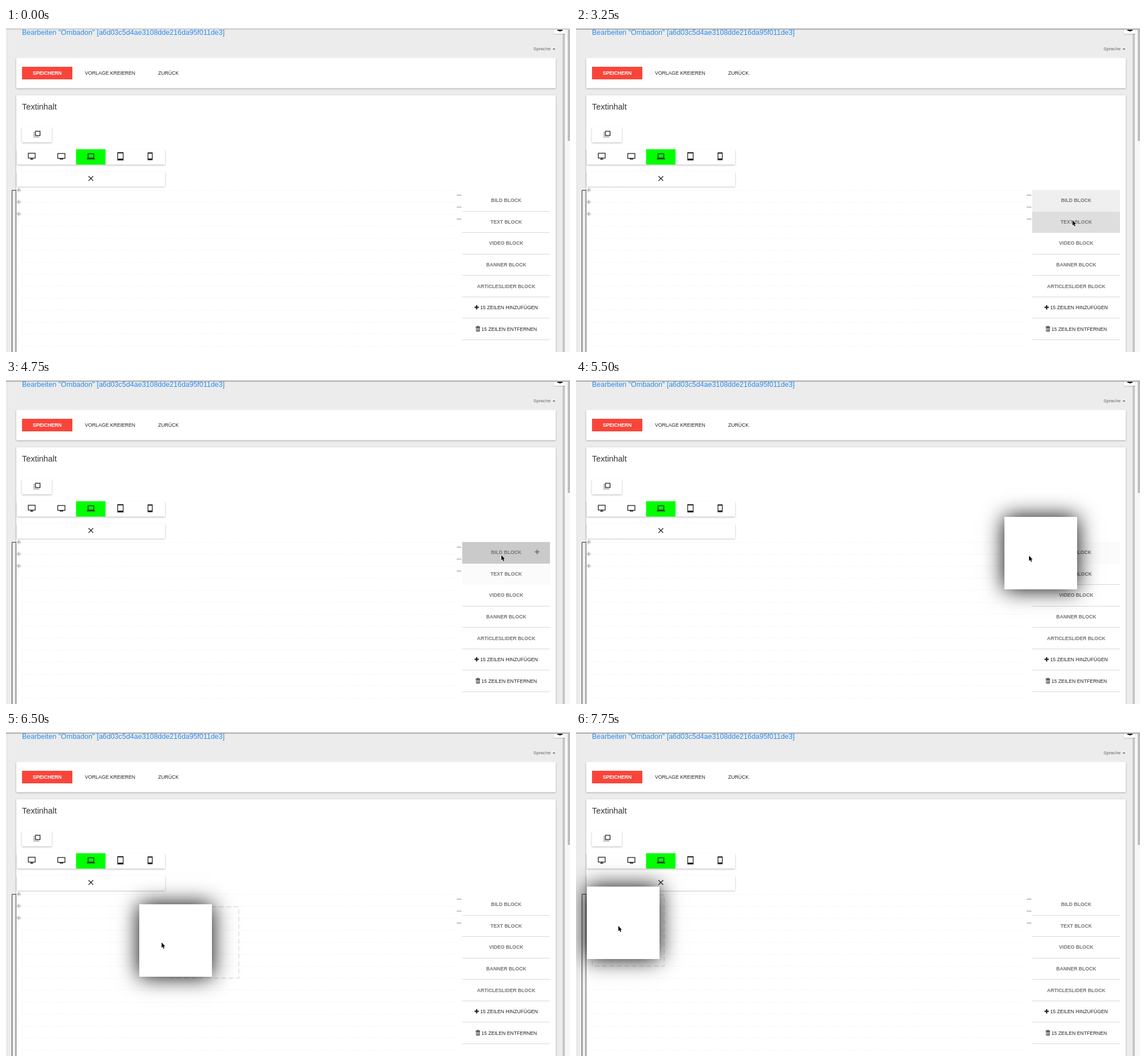
An HTML page with a canvas for the animation above (8 s loop, 986 by 568 pixels).

```html
<!DOCTYPE html>
<html lang="de">
<head>
<meta charset="utf-8">
<title>Block-Editor</title>
<style>
html, body { margin: 0; width: 100%; height: 100%; overflow: hidden; background: #ececec; }
canvas { display: block; }
</style>
</head>
<body>
<canvas id="stage" width="986" height="568"></canvas>
<script>
const W = 986, H = 568, LOOP = 8000, STEP = 250;
const ctx = document.getElementById('stage').getContext('2d');
const FONT = '"Liberation Sans", Arial, sans-serif';
const MENU = ['BILD BLOCK', 'TEXT BLOCK', 'VIDEO BLOCK', 'BANNER BLOCK', 'ARTICLESLIDER BLOCK'];
const ROW_TOP = 284, ROW_H = 37.55;

// time, x, y
const POINTER = [
  [750, 791, 26], [1500, 839, 204], [1750, 839, 204], [3000, 867, 300], [3250, 868, 337],
  [3500, 868, 348], [3750, 868, 366], [4000, 868, 372], [4250, 868, 342], [4500, 867, 314],
  [4750, 866, 307], [5000, 866, 307], [5250, 850, 308], [5500, 792, 308], [5750, 606, 343],
  [6000, 399, 381], [6750, 209, 363], [7000, 173, 359], [7750, 74, 340]
];
const CARD = [
  [5250, 807, 240], [5500, 749, 240], [5750, 556, 276], [6000, 356, 313],
  [6750, 171, 297], [7000, 136, 293], [7750, 19, 271]
];

function along(keys, t) {
  if (t < keys[0][0]) return null;
  const i = keys.findIndex(k => k[0] > t);
  if (i < 0) return keys[keys.length - 1].slice(1);
  const [t0, x0, y0] = keys[i - 1], [t1, x1, y1] = keys[i];
  const p = (t - t0) / (t1 - t0);
  return [Math.round(x0 + (x1 - x0) * p), Math.round(y0 + (y1 - y0) * p)];
}

function rect(x, y, w, h, color) {
  ctx.fillStyle = color;
  ctx.fillRect(x, y, w, h);
}

function line(points, color, width = 1) {
  ctx.strokeStyle = color;
  ctx.lineWidth = width;
  ctx.beginPath();
  points.forEach(([x, y], i) => i ? ctx.lineTo(x, y) : ctx.moveTo(x, y));
  ctx.stroke();
}

function box(x, y, w, h, width = 1.3, color = '#222') {
  ctx.strokeStyle = color;
  ctx.lineWidth = width;
  ctx.strokeRect(x, y, w, h);
}

function text(str, x, y, size, color, bold = false, align = 'left') {
  ctx.font = `${bold ? 'bold ' : ''}${size}px ${FONT}`;
  ctx.fillStyle = color;
  ctx.textAlign = align;
  ctx.fillText(str, x, y);
}

function panel(x, y, w, h, blur = 3, shade = 0.3, dy = 1) {
  ctx.save();
  ctx.shadowColor = `rgba(0,0,0,${shade})`;
  ctx.shadowBlur = blur;
  ctx.shadowOffsetY = dy;
  rect(x, y, w, h, '#fff');
  ctx.restore();
}

function plus(x, y, r, color, width = 2) {
  line([[x - r, y], [x + r, y]], color, width);
  line([[x, y - r], [x, y + r]], color, width);
}

function drawFrame(t) {
  rect(0, 0, W, H, '#ececec');
  rect(0, 0, 1, H, '#f8f8f8');
  rect(1, 0, 1, H, '#e0e0e0');
  rect(973, 0, 4, H, '#c6c6c6');
  rect(977, 0, 9, H, '#f7f7f7');
  rect(982, 0, 4, 198, '#bebebe');
  panel(958, 0, 20, 10, 2, 0.2);
  rect(964, 3, 9, 2, '#222');
  rect(967, 4, 3, 2, '#222');
  rect(0, 0, W, 2, '#e6e6e6');
  rect(0, 1.5, W, 1.5, t < 2000 ? '#cacaca' : '#a2a2a2');
  text('Bearbeiten "Ombadon" [a6d03c5d4ae3108dde216da95f011de3]', 28, 11.5, 12.46, '#2a8af0');
  text('Sprache', 922, 39, 8.1, '#666');
  ctx.beginPath();
  ctx.moveTo(955.5, 36); ctx.lineTo(960.5, 36); ctx.lineTo(958, 38.5);
  ctx.fill();
}

function drawToolbar() {
  panel(18, 52.5, 943, 53);
  rect(28, 68, 88, 22, '#f94539');
  text('SPEICHERN', 72, 82, 8.7, '#fff', true, 'center');
  text('VORLAGE KREIEREN', 138, 82, 8.62, '#222');
  text('ZURÜCK', 266, 82, 8.62, '#222');
}

function drawDevices() {
  panel(19, 212.5, 259, 27);
  rect(122.5, 212.5, 51.5, 27, '#0f0');
  // desktop monitor
  box(39, 219.5, 12, 8.5);
  rect(44, 228, 2, 2, '#222');
  rect(42, 229.5, 6, 1.2, '#222');
  // television
  box(90.5, 220, 12.5, 8.5);
  rect(94, 229, 6, 1.5, '#222');
  // laptop
  box(143.5, 220.5, 10, 7.5);
  rect(141.5, 228.5, 14, 1.7, '#222');
  // tablet
  box(195.3, 218.5, 9.5, 13);
  rect(195, 217.8, 10, 2, '#222');
  rect(195, 229, 10, 2.5, '#222');
  // phone
  box(248.2, 219, 7.5, 12);
  rect(248, 218.3, 8, 2, '#222');
  rect(248, 228.7, 8, 2.5, '#222');
}

function drawEditor() {
  panel(18, 118, 943, 470);
  text('Textinhalt', 28, 143, 14.4, '#333');

  panel(28, 173.5, 52, 27);
  box(51.5, 181, 8, 7.5);
  for (let i = 0; i < 4; i++) {
    rect(48.5, 182.5 + i * 2.6, 1.3, 1.3, '#222');
    if (i) rect(48.5 + i * 2.6, 190.3, 1.3, 1.3, '#222');
  }
  drawDevices();
  panel(19, 251.5, 259, 26.5);
  line([[144.2, 259.7], [152.4, 267.9]], '#222', 1.3);
  line([[152.4, 259.7], [144.2, 267.9]], '#222', 1.3);

  line([[18, 284.5], [10.5, 284.5], [10.5, H]], '#333');
  line([[17.5, 284], [17.5, H]], '#555');
  ctx.setLineDash([2, 2]);
  for (let y = 284.5; y < H; y += 21) line([[28, y], [786, y]], '#f3f3f3');
  ctx.setLineDash([]);
  for (let i = 0; i < 3; i++) {
    plus(22.3, 284 + i * 21, 3.7, '#bdbdbd');
    rect(788, 292 + i * 21, 8, 2, '#c2c2c2');
  }
}

function hoverRow(n) {
  const pos = along(POINTER, n * STEP);
  if (!pos || pos[0] < 797 || pos[1] < ROW_TOP || along(CARD, n * STEP)) return -1;
  return Math.floor((pos[1] - ROW_TOP) / ROW_H);
}

// Darkens over two steps, then fades over two steps.
function hoverShade(row, n) {
  if (hoverRow(n) === row) return hoverRow(n - 1) === row ? '#cacaca' : '#dedede';
  if (hoverRow(n - 1) === row) return '#efefef';
  return hoverRow(n - 2) === row ? '#fbfbfb' : null;
}

function drawMenu(n) {
  for (let i = 0; i < 7; i++) {
    const top = ROW_TOP + i * ROW_H, mid = top + 18.3;
    const shade = hoverShade(i, n);
    rect(797.5, Math.round(top + ROW_H) - 1, 153.5, 1, '#d9d9d9');
    if (shade) rect(797.5, Math.round(top), 153.5, Math.round(top + ROW_H) - Math.round(top), shade);
    if (i < MENU.length) text(MENU[i], 874.5, mid + 3, 8.62, '#757575', true, 'center');
    if (shade === '#cacaca') plus(928.5, mid - 1, 4, '#757575');
  }
  text('15 ZEILEN HINZUFÜGEN', 829, 493.2, 8.6, '#222');
  plus(822.8, 489.6, 3.8, '#222', 2.2);
  text('15 ZEILEN ENTFERNEN', 831.3, 530.8, 8.6, '#222');
  box(822.3, 525, 5.5, 6.5, 1, '#333');
  rect(821, 523.5, 8, 1.2, '#333');
  rect(823.5, 522.4, 3, 1.2, '#333');
  rect(824, 525, 0.8, 6, '#333');
  rect(825.6, 525, 0.8, 6, '#333');
}

function drawCard(x, y) {
  const col = Math.round((x - 28) / 126.5), row = Math.ceil((y - 285) / 21);
  if (col < 6) {
    ctx.setLineDash([8, 5]);
    box(28.5 + col * 126.5, 285.5 + Math.max(0, row) * 21, 125.5, 125, 1.3, '#dcdcdc');
    ctx.setLineDash([]);
  }
  panel(x, y, 127, 127, 36, 1, 0);
}

function drawPointer(x, y) {
  ctx.save();
  ctx.translate(x, y);
  ctx.beginPath();
  [[0, 0], [0, 9], [2, 7.2], [3.5, 10.8], [5, 10.1], [3.6, 6.7], [6.2, 6.5]]
    .forEach(p => ctx.lineTo(...p));
  ctx.closePath();
  ctx.strokeStyle = '#fff';
  ctx.lineWidth = 1.2;
  ctx.stroke();
  ctx.fillStyle = '#000';
  ctx.fill();
  ctx.restore();
}

function draw(t) {
  drawFrame(t);
  drawToolbar();
  drawEditor();
  drawMenu(t / STEP);
  const card = along(CARD, t), pointer = along(POINTER, t);
  if (card) drawCard(...card);
  if (pointer) drawPointer(...pointer);
}

const start = performance.now();
function tick() {
  const t = (performance.now() - start) % LOOP;
  draw(Math.floor(t / STEP) * STEP);
  requestAnimationFrame(tick);
}
tick();
</script>
</body>
</html>
```
